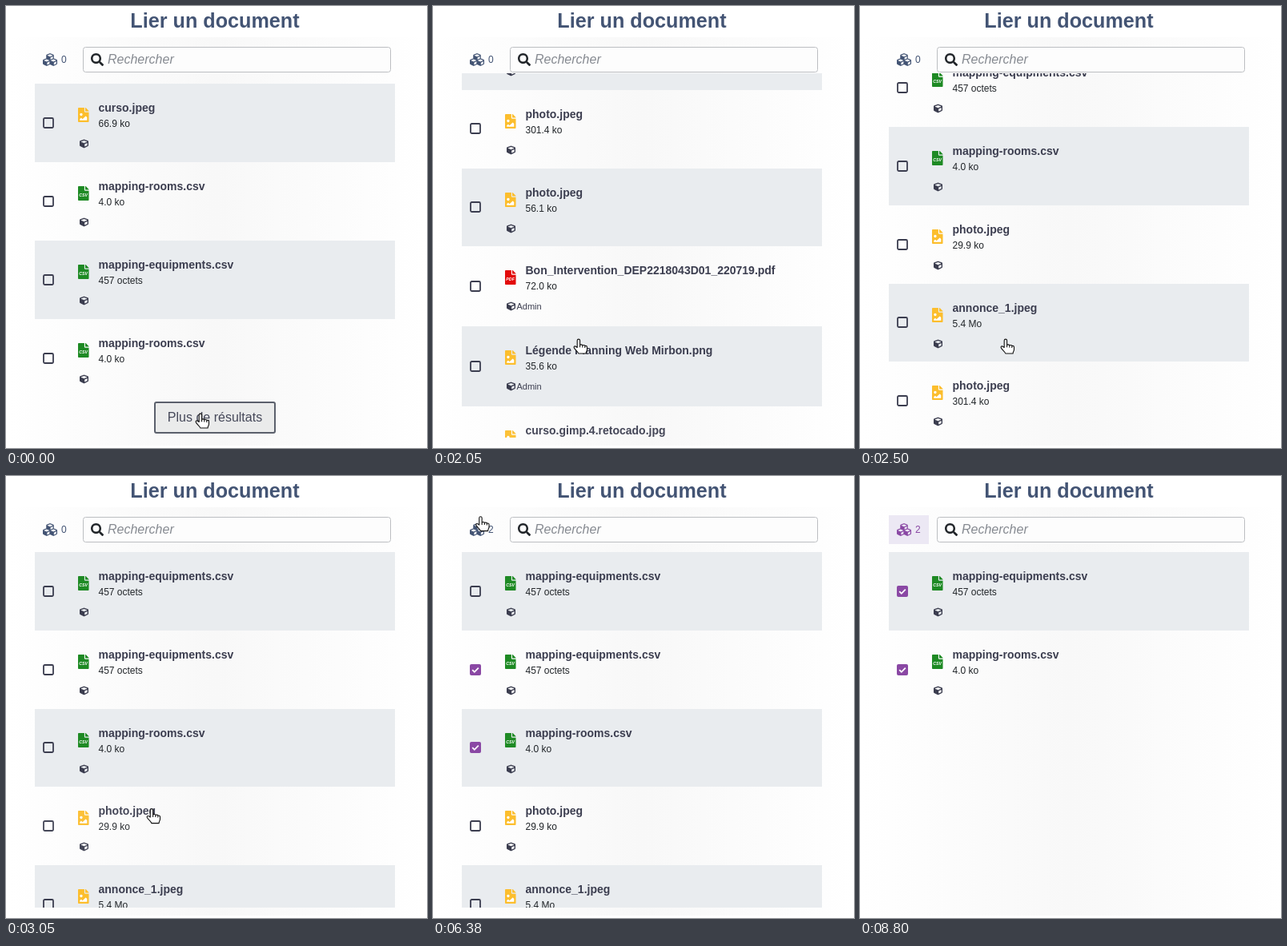
Animation of 526x552 px, one loop 9270 ms. Source, as an HTML page:

```html
<!DOCTYPE html>
<html lang="fr">
<head>
<meta charset="utf-8">
<title>Lier un document</title>
<style>
html, body { margin: 0; width: 100%; height: 100%; overflow: hidden; background: #fff; }
svg { display: block; width: 526px; height: 552px; font-family: "Liberation Sans", Arial, sans-serif; }
.name { font: bold 14px "Liberation Sans", Arial, sans-serif; fill: #3b3d4f; }
.size { font-size: 12px; fill: #212529; }
.owner { font-size: 11px; fill: #3b3d4f; }
.tag { font: italic bold 150px "Liberation Sans", Arial, sans-serif; fill: #fff; text-anchor: middle; }
</style>
</head>
<body>
<svg viewBox="0 0 526 552">
  <defs>
    <linearGradient id="shade">
      <stop offset="0" stop-color="#fff"/>
      <stop offset=".5" stop-color="#f8f8f8"/>
      <stop offset="1" stop-color="#fff"/>
    </linearGradient>
    <clipPath id="view"><rect y="84" width="526" height="455"/></clipPath>
    <path id="cube" d="M239 6L31 84C12 91 0 109 0 129v225c0 18 10 35 26 43l208 104c14 7 30 7 43 0l208-104c17-8 27-25 27-43V129c0-20-12-38-31-45L273 6c-11-4-23-4-34 0zM256 68l192 72v2l-192 78L64 142v-2zM288 424V275l160-65v134z"/>
    <path id="cubes" d="M489 250L392 214V105c0-15-9-28-23-33L269 34c-8-3-18-3-26 0L143 72c-14 5-23 18-23 33v109l-97 36C9 255 0 269 0 284v110c0 14 8 26 20 32l100 50c10 5 22 5 32 0l104-52 104 52c10 5 22 5 32 0l100-50c12-6 20-18 20-32V284c0-15-9-29-23-34zM358 215l-85 32v-69l85-37zM154 104l102-38 102 38-102 42zM238 395l-85 43v-79l85-39zM238 283l-102 42L34 283l102-39zM478 395l-85 43v-79l85-39zM478 283l-102 42-102-42 102-39z"/>
    <path id="file" d="M224 136V0H24C11 0 0 11 0 24v464c0 13 11 24 24 24h336c13 0 24-11 24-24V160H248c-13 0-24-11-24-24zM384 122v6H256V0h6c6 0 12 3 17 7l98 98c4 5 7 11 7 17z"/>
    <path id="landscape" fill="#fff" d="M112 192a48 48 0 1 0 .1 0zM64 448v-48l40-32c5-5 12-4 17 0l39 40 104-104c5-4 12-4 17 0l39 40v104z"/>
  </defs>
  <rect y="39" width="526" height="510" fill="url(#shade)"/>
  <text x="261" y="27" text-anchor="middle" font-size="25.2" font-weight="bold" fill="#435474">Lier un document</text>

  <g id="lists" clip-path="url(#view)">
    <g id="more">
      <rect id="face" x="186" y="1" width="150" height="38" rx="2" stroke="#5b606c" stroke-width="2"/>
      <text x="261" y="25" text-anchor="middle" font-size="16" fill="#454859">Plus de résultats</text>
    </g>
  </g>

  <rect id="tab" x="36" y="49" width="50" height="36" fill="#ece8f4"/>
  <g id="counter">
    <use href="#cubes" transform="translate(46 58) scale(.0352)"/>
    <text id="count" x="69" y="71" font-size="12"></text>
  </g>
  <rect x="96.5" y="51.5" width="384" height="31" rx="3" fill="#fdfdfd" stroke="#bcbec2"/>
  <path transform="translate(106 59) scale(.0313)" fill="#212529" d="M505 443L405 343c-4-4-10-7-17-7h-16c28-35 44-80 44-128C416 93 323 0 208 0S0 93 0 208s93 208 208 208c48 0 93-16 128-44v16c0 7 3 13 7 17l100 100c9 9 24 9 34 0l28-28c9-10 9-25 0-34zM208 336a128 128 0 1 1 0-256 128 128 0 0 1 0 256z"/>
  <text x="127" y="72" font-size="16" font-style="italic" fill="#868a91">Rechercher</text>

  <g id="cursor" fill="#fff" stroke="#111" stroke-width="1.1" stroke-linejoin="round">
    <path id="hand" d="M-1.8 10V1.3a1.7 1.7 0 0 1 3.4 0V7c.6-.9 3-.8 3.2.4.8-.8 2.8-.5 3 .7 1.2-.6 2.7 0 2.7 1.5v2.9c0 2-1.4 2.6-1.4 5H-.2c-.3-2-4.8-5-5.6-7.3-.5-1.5 1.2-2.4 2.3-1.4zM1.6 7v2.8M4.8 7.4v2.6M7.8 8.1v2.3"/>
    <path id="arrow" d="M0 0V15.5L3.6 12.2 6 17.6 8.4 16.5 6.1 11.3H11z"/>
  </g>
</svg>
<script>
const LOOP = 9270, ROW = 97.8, ADMIN_EXTRA = 2, FADE = 180;
const $ = id => document.getElementById(id);
const clamp = v => Math.max(0, Math.min(1, v));

const COLORS = { csv: '#1e8a24', pdf: '#e30b0b', img: '#fcbe2d' };
const equip = ['mapping-equipments.csv', '457 octets'];
const rooms = ['mapping-rooms.csv', '4.0 ko'];
const FILES = {
  first: [['curso.jpeg', '66.9 ko'], rooms, equip, rooms],
  next: [
    equip, equip, rooms,
    ['photo.jpeg', '29.9 ko'],
    ['annonce_1.jpeg', '5.4 Mo'],
    ['photo.jpeg', '301.4 ko'],
    ['photo.jpeg', '56.1 ko'],
    ['Bon_Intervention_DEP2218043D01_220719.pdf', '72.0 ko', 'Admin'],
    ['Légende Planning Web Mirbon.png', '35.6 ko', 'Admin'],
    ['curso.gimp.4.retocado.jpg', '129.8 ko']
  ],
  picked: [equip, rooms]
};

// [time, value...] keys, linear between them
const SCROLL = [[1900, -492.5], [2230, -255.9], [2680, 95]];
const PATH = [
  [1190, 243, 509.5], [1420, 182, 416.5], [3050, 182, 416.5], [3480, 190, 250],
  [4130, 190, 250], [4420, 195, 351.5], [5230, 195, 351.5], [5450, 165, 165],
  [5880, 165, 165], [6130, 59.5, 51], [6380, 59.5, 51], [6480, 63, 60],
  [6750, 63, 60], [6780, 62, 68.5], [7480, 62, 68.5], [8000, 120, 306],
  [8380, 120, 306], [8600, 60, 90], [8780, 45, 17]
];
// [row, enter, leave]
const HOVERS = {
  first: [],
  next: [[9, 1260, 1900], [3, 3020, 3200], [2, 3200, 3400], [1, 3400, 4250],
         [2, 4250, 5290], [1, 5290, 5380], [0, 5380, 6000]],
  picked: [[0, 7550, 7750], [1, 7750, 7950], [1, 8400, 8490], [0, 8490, 8590]]
};
const CHECKS = { first: {}, next: { 1: 3930, 2: 4850 }, picked: { 0: 0, 1: 0 } };

function at(keys, t) {
  if (t <= keys[0][0]) return keys[0].slice(1);
  const i = keys.findIndex(k => k[0] > t);
  if (i < 0) return keys[keys.length - 1].slice(1);
  const a = keys[i - 1], b = keys[i], p = (t - a[0]) / (b[0] - a[0]);
  return a.slice(1).map((v, n) => v + (b[n + 1] - v) * p);
}

function make(tag, parent, attrs = {}) {
  const el = document.createElementNS('http://www.w3.org/2000/svg', tag);
  for (const k in attrs) el.setAttribute(k, attrs[k]);
  parent.appendChild(el);
  return el;
}

const move = (el, x, y) => el.setAttribute('transform', `translate(${x} ${y})`);
const show = (el, on) => el.setAttribute('visibility', on ? 'inherit' : 'hidden');

function makeRow(parent, [name, size, owner], i) {
  const g = make('g', parent);
  const bg = i % 2 ? null : make('rect', g, { x: 36, width: 450, fill: '#e9ecef' });
  const ext = name.split('.').pop();
  const kind = COLORS[ext] ? ext : 'img';
  const box = make('g', g);
  const off = make('rect', box, { x: 47, y: -6, width: 12, height: 12, rx: 1.5, fill: 'none', stroke: '#3b3d4f', 'stroke-width': 1.8 });
  const on = make('g', box);
  make('rect', on, { x: 46, y: -7, width: 14, height: 14, rx: 2, fill: '#8a48a4' });
  make('path', on, { d: 'M49.2 .2l2.6 2.6 5-5.2', fill: 'none', stroke: '#fff', 'stroke-width': 1.8 });

  const icon = make('g', g, { transform: 'translate(90 30) scale(.0352)' });
  make('use', icon, { href: '#file', fill: COLORS[kind] });
  if (kind === 'img') make('use', icon, { href: '#landscape' });
  else make('text', icon, { x: 188, y: 376, class: 'tag' }).textContent = kind.toUpperCase();

  const text = (x, y, cls, s) => make('text', g, { x, y, class: cls }).textContent = s;
  text(115.5, 35, 'name', name);
  text(115.5, 54, 'size', size);
  make('use', g, { href: '#cube', fill: '#3b3d4f', transform: 'translate(92 69.5) scale(.0215)' });
  if (owner) text(104.5, 79, 'owner', owner);
  return { g, bg, box, off, on, extra: owner ? ADMIN_EXTRA : 0 };
}

const lists = {};
for (const key in FILES) {
  const g = make('g', $('lists'));
  lists[key] = { g, rows: FILES[key].map((f, i) => makeRow(g, f, i)) };
}

function drawList(key, base, t) {
  let y = base;
  lists[key].rows.forEach((r, i) => {
    const top = Math.round(y), end = y + ROW + r.extra;
    move(r.g, 0, top);
    if (r.bg) r.bg.setAttribute('height', Math.round(end) - top);
    move(r.box, 0, Math.round(y + 48.7 + r.extra / 2) - top);
    const checked = t >= (CHECKS[key][i] ?? Infinity);
    show(r.on, checked);
    show(r.off, !checked);
    let dim = 0;
    for (const [row, enter, leave] of HOVERS[key])
      if (row === i) dim += clamp((t - enter) / FADE) * (1 - clamp((t - leave) / FADE));
    r.g.setAttribute('opacity', 1 - .32 * clamp(dim));
    y = end;
  });
  return y;
}

function draw(t) {
  const key = t < 1000 ? 'first' : t < 6980 ? 'next' : 'picked';
  for (const k in lists) show(lists[k].g, k === key);
  const base = key === 'first' ? 97.4 : key === 'next' ? at(SCROLL, t)[0] : 95;
  const bottom = drawList(key, base, t);

  show($('more'), key !== 'picked');
  move($('more'), 0, Math.round(key === 'first' ? 494 : bottom + 4.4));
  const press = t < 650 ? 0 : 1 - clamp((t - 800) / 200);
  const tone = Math.round(234 - 20 * press);
  $('face').setAttribute('fill', `rgb(${tone},${tone + 1},${tone + 1})`);

  const active = t >= 6880;
  show($('tab'), active);
  $('counter').setAttribute('fill', active ? '#8a48a4' : '#435474');
  $('count').textContent = t < 3930 ? 0 : t < 4850 ? 1 : 2;

  const [x, y] = at(PATH, t);
  const onRow = y > 95 && (key !== 'picked' || y < 291);
  const onTab = x < 86 && y > 49 && y < 85;
  show($('cursor'), t < 8800);
  show($('hand'), onRow || onTab);
  show($('arrow'), !(onRow || onTab));
  move($('cursor'), x, y);
}

const start = performance.now();
function tick() {
  draw((performance.now() - start) % LOOP);
  requestAnimationFrame(tick);
}
tick();
</script>
</body>
</html>
```
